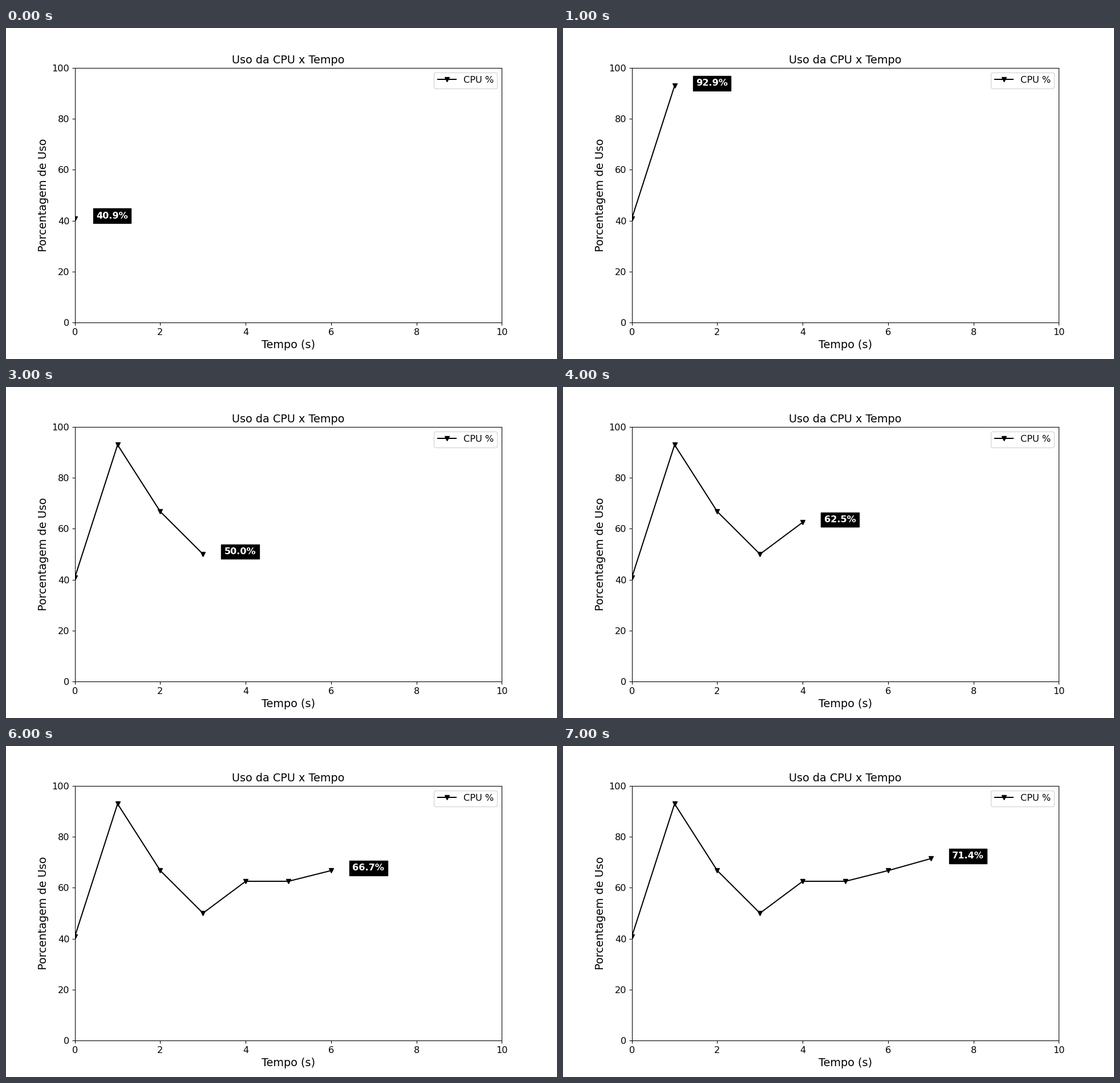
Animation of 966x580 px, one loop 8000 ms. Source, as a matplotlib script:

```python
import matplotlib.pyplot as plt
from matplotlib.animation import FuncAnimation

WIDTH, HEIGHT, DPI = 966, 580, 96.6
EPS = 1e-3  # keeps the pixel size from being truncated by rounding
USAGE = [40.9, 92.9, 66.7, 50.0, 62.5, 62.5, 66.7, 71.4]

plt.rcParams.update({
    "font.family": "DejaVu Sans",
    "font.size": 12,
    "axes.titlesize": 14.4,
    "axes.labelsize": 14.4,
})

fig, ax = plt.subplots(
    figsize=((WIDTH + EPS) / DPI, (HEIGHT + EPS) / DPI), dpi=DPI)
ax.set(xlim=(0, 10), ylim=(0, 100), title="Uso da CPU x Tempo",
       xlabel="Tempo (s)", ylabel="Porcentagem de Uso")

line, = ax.plot([], [], color="black", marker="v", label="CPU %")
ax.legend(loc="upper right")
tag = ax.text(0, 0, "", color="white", weight="bold",
              bbox=dict(facecolor="black"))


def update(second):
    usage = USAGE[second]
    line.set_data(range(second + 1), USAGE[:second + 1])
    tag.set_position((second + 0.5, usage))
    tag.set_text(f"{usage:.1f}%")
    return line, tag


anim = FuncAnimation(fig, update, frames=len(USAGE), init_func=lambda: update(0),
                     interval=1000, repeat=True, repeat_delay=0)
plt.show()
```
